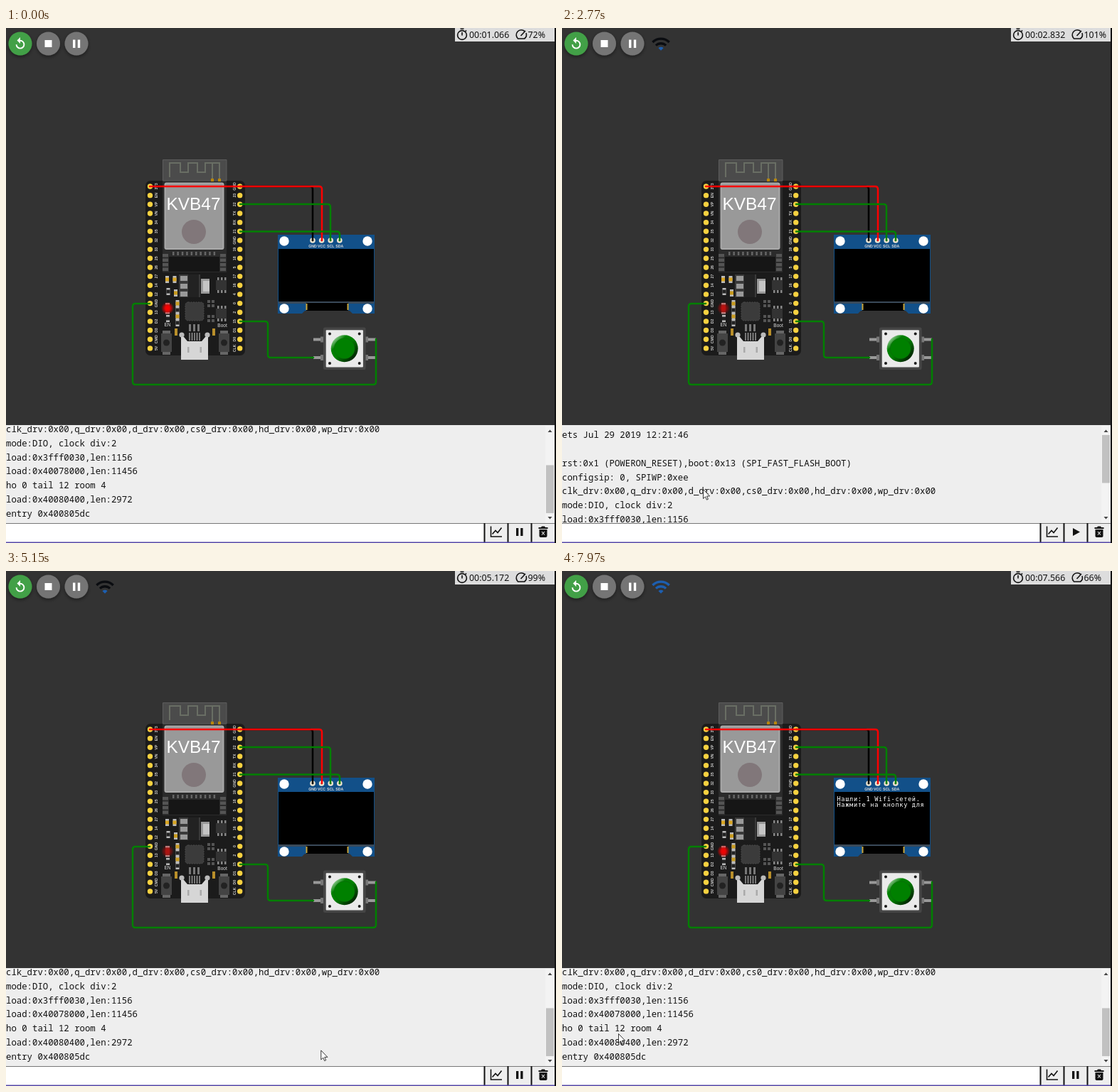
An HTML page for the animation above (8000 ms loop, 773 by 725 pixels).

```html
<!DOCTYPE html>
<html lang="en">
<head>
<meta charset="utf-8">
<title>Board simulation</title>
<style>
html, body { margin: 0; width: 100%; height: 100%; overflow: hidden; background: #333; }
svg { display: block; position: absolute; left: 0; top: 0; }
.ui { font: 12.4px "Noto Sans", "Open Sans", sans-serif; fill: #111; }
.log { font: 12.33px "Noto Sans Mono", monospace; fill: #111; }
.pin { font: bold 5.2px "Liberation Sans", sans-serif; fill: #ccc; text-anchor: middle; }
.tiny { font: 6.5px "Liberation Sans", sans-serif; fill: #ddd; text-anchor: middle; }
.lcd { font: 8.6px "DejaVu Sans Mono", monospace; letter-spacing: .68px; fill: #fff; }
.wire { fill: none; stroke: #008000; stroke-width: 2.5; stroke-linecap: round; }
.icon { fill: none; stroke: #111; stroke-width: 1.6; }
</style>
</head>
<body>
<svg width="773" height="725" viewBox="0 0 773 725">
  <defs>
    <radialGradient id="glow">
      <stop offset="0" stop-color="#f00"/>
      <stop offset=".4" stop-color="#f00" stop-opacity=".85"/>
      <stop offset="1" stop-color="#f00" stop-opacity="0"/>
    </radialGradient>
    <linearGradient id="cap" x2="1" y2="1">
      <stop offset="0" stop-color="#fff"/><stop offset=".3" stop-color="#008000"/>
      <stop offset=".5" stop-color="#008000"/><stop offset="1" stop-color="#000"/>
    </linearGradient>
    <filter id="soft" x="-50%" y="-50%" width="200%" height="200%">
      <feDropShadow dx="0" dy="2" stdDeviation="2.5" flood-opacity=".45"/>
    </filter>
    <clipPath id="pane"><path d="M0 560H758V697H0Z"/></clipPath>
  </defs>
  <path fill="#333" d="M0 0H773V725H0Z"/>

  <!-- toolbar -->
  <g filter="url(#soft)">
    <circle cx="20" cy="22" r="16.5" fill="#43a047"/>
    <circle cx="59.5" cy="22" r="16.5" fill="#757575"/>
    <circle cx="99" cy="22" r="16.5" fill="#757575"/>
  </g>
  <path d="M20 17.8A5.4 5.4 0 1 1 14.6 23.2" fill="none" stroke="#fff" stroke-width="1.9"/>
  <path d="M20 13V22L15.5 17.5Z" fill="#fff"/>
  <path d="M54.5 17H64.5V27H54.5ZM94 16.5H97.4V28H94ZM100.8 16.5H104.2V28H100.8Z" fill="#fff"/>
  <g id="wifi" transform="translate(125 8.3) scale(1.17)">
    <path d="M1 9l2 2c4.97-4.97 13.03-4.97 18 0l2-2C16.93 2.93 7.08 2.93 1 9z"/>
    <path d="M5 13l2 2c2.76-2.76 7.24-2.76 10 0l2-2C15.14 9.14 8.87 9.14 5 13z"/>
    <path d="M9 17l3 3 3-3c-1.65-1.66-4.34-1.66-6 0z" fill="#1d5fb0"/>
  </g>

  <!-- status -->
  <path fill="#ddd" d="M631 0H771V19H631Z"/>
  <g class="icon">
    <circle cx="641" cy="10" r="6.4"/>
    <path d="M638.5 1.2H643.5M641 6V10.5M645.6 4.8L647 3.4"/>
    <path d="M719.5 15A7 7 0 1 1 729 4.6M731 7A7 7 0 0 1 728.6 15M719 15H729"/>
    <path d="M723.5 11L730 4"/>
  </g>
  <text id="clock" class="ui" x="651" y="14"></text>
  <text id="load" class="ui" x="733.5" y="14"></text>

  <!-- board -->
  <rect x="196" y="215" width="140" height="246" rx="7" fill="#1b1b1b"/>
  <path fill="#2b2b2b" d="M220 185H310V344H220Z"/>
  <path fill="#4b4b4b" stroke="#5d5d5d" d="M220.5 185.5H310V215H220.5Z"/>
  <path fill="none" stroke="#696e64" stroke-width="2" d="M230 210V190H245V203H256V190H269V203H280V190H290V214M290 190H300V214"/>
  <path fill="#b8860b" d="M288 212H292V216H288ZM298 212H302V216H298Z"/>
  <rect x="223.5" y="218.5" width="82" height="92.5" rx="2" fill="#999" stroke="#aaa" stroke-width="2"/>
  <text x="263.5" y="256" text-anchor="middle" fill="#fff" style="font:24.4px 'Liberation Sans',Arial,sans-serif">KVB47</text>
  <circle cx="264" cy="287" r="17" fill="#81777a"/>
  <path fill="#161616" d="M229 322H300V343H229Z"/>
  <g id="parts"></g>
  <rect x="252" y="386" width="26" height="26" rx="4" fill="#3b3b3b" stroke="#4a4a4a" stroke-dasharray="2 1.5"/>
  <g id="pins"></g>
  <path fill="none" stroke="#aaa" stroke-width="1.3" d="M258 429V440M261.5 429V440M265 429V440M268.5 429V440M272 429V440"/>
  <circle cx="247" cy="432" r="3.6" fill="#bbb"/><circle cx="283" cy="432" r="3.6" fill="#bbb"/>
  <path fill="#d6d6d6" d="M246 435H250L255 441H275L280 435H284V467H246Z"/>
  <path fill="#aaa" d="M255 449H257.5V457H255ZM272.5 449H275V457H272.5Z"/>
  <text class="tiny" x="227" y="420">EN</text>
  <text class="tiny" x="304" y="421">Boot</text>

  <!-- display -->
  <path fill="#125089" d="M382 291H518V402H487L483 398H420L416 402H382Z"/>
  <g fill="#fff">
    <circle cx="391" cy="300" r="6.7"/><circle cx="508" cy="300" r="6.7"/>
    <circle cx="391" cy="395" r="6.7"/><circle cx="508" cy="395" r="6.7"/>
  </g>
  <path fill="#3a4a5a" d="M383 385H517V388H383Z"/>
  <path fill="#000" d="M383 311H517V385H383ZM422 387H481V398H422Z"/>
  <path fill="#c9a43b" d="M421.5 388H423.5V397H421.5ZM479.5 388H481.5V397H479.5Z"/>
  <g id="lcd" class="lcd">
    <text x="386.5" y="324">Нашли: 1 Wifi-сетей.</text>
    <text x="386.5" y="332">Нажмите на кнопку для</text>
  </g>
  <g id="header"></g>

  <!-- push button -->
  <path stroke="#999" stroke-width="4" d="M432 438.5H447M432 464H447M504 438.5H520M504 464H520"/>
  <path stroke="#777" stroke-width="8" d="M442 438.5H447M442 464H447M504 438.5H509M504 464H509"/>
  <rect x="446" y="421.5" width="59.6" height="59.5" rx="2.2" fill="#464646"/>
  <rect x="449.7" y="425.2" width="52.2" height="52.2" rx="1" fill="#eaeaea"/>
  <g fill="#1b1b1b">
    <circle cx="455" cy="430.5" r="2"/><circle cx="496.7" cy="430.5" r="2"/>
    <circle cx="455" cy="472" r="2"/><circle cx="496.7" cy="472" r="2"/>
  </g>
  <circle cx="475.7" cy="451.2" r="19" fill="url(#cap)"/>
  <circle cx="475.7" cy="451.2" r="14.5" fill="#008000" stroke="#2f2f2f" stroke-opacity=".47" stroke-width=".4"/>

  <!-- wires -->
  <path class="wire" style="stroke:#000" d="M329 223H427Q431 223 431 227V299"/>
  <path class="wire" style="stroke:#f00" d="M202 223H440Q444 223 444 227V299"/>
  <path class="wire" d="M329 248H452Q456 248 456 252V299"/>
  <path class="wire" d="M329 286.5H465Q469 286.5 469 290.5V299"/>
  <path class="wire" d="M329 413H364Q368 413 368 417V460Q368 464 372 464H432"/>
  <path class="wire" d="M202 388H182Q178 388 178 392V498Q178 502 182 502H516Q520 502 520 498V438"/>
  <circle id="led" cx="227" cy="394.5" r="9" fill="url(#glow)"/>

  <!-- serial monitor -->
  <path fill="#eee" d="M0 559H771V697H0Z"/>
  <g clip-path="url(#pane)"><g id="log" class="log"></g></g>
  <path fill="#f3f3f3" d="M758 560H771V697H758Z"/>
  <rect id="thumb" x="759" width="11" height="67.5" fill="#c1c1c1"/>
  <path fill="#444" d="M761.5 569H767.5L764.5 565.5ZM761.5 688H767.5L764.5 691.5Z"/>
  <path fill="#fff" d="M0 697H672V724H0Z"/>
  <path fill="#eee" d="M672 697H771V724H672Z"/>
  <path stroke="#777" d="M0 697.5H771"/>
  <path stroke="#111" stroke-width="2" d="M672.5 697V724M705.5 697V724M738.5 697V724"/>
  <path class="icon" d="M681.5 701.5V716H697M683.5 712.5L688 707.5L691 710.5L696.5 703.5"/>
  <path id="toggle" fill="#111"/>
  <path fill="#111" d="M748.5 703H752L753 701.5H757L758 703H761.5V705H748.5ZM749.5 706H760.5V715Q760.5 717 758.5 717H751.5Q749.5 717 749.5 715Z"/>
  <path stroke="#eee" stroke-width="1.1" d="M753 709L757 713.5M757 709L753 713.5"/>
  <path fill="#5548a8" d="M0 723.5H771V725H0Z"/>
  <path fill="#111" d="M771 0H773V725H771Z"/>

  <g id="cursor" fill="#fff" stroke="#222" stroke-linejoin="round">
    <path id="arrow" stroke-width=".9" d="M.5 .5V13.5L3.5 10.8L5.4 15.2L7.4 14.3L5.5 10H9.6Z"/>
    <path id="hand" d="M-1.7 11V1.5Q0 -1 1.7 1.5V6.5Q3 5.7 4 7Q5.2 6.4 6 7.8Q8 7.5 7.7 10.5Q7.6 14 6 16V19H-1.5V17L-5.6 11.5Q-5.8 9 -3.6 9.6Z"/>
  </g>
</svg>
<script>
const $ = id => document.getElementById(id);
const LOOP = 8000, STEP = 68.3, SCROLL_END = 87.5;

// ---- static repeats
const LEFT = '3V3 EN VP VN 34 35 32 33 25 26 27 14 12 GND 13 D2 D3 CMD 5V'.split(' ');
const RIGHT = 'GND 23 22 TX RX 21 GND 19 18 5 17 16 4 0 2 15 D1 D0 CLK'.split(' ');
const box = (x, y, w, h, fill) =>
  `<rect x="${x}" y="${y}" width="${w}" height="${h}" fill="${fill}"/>`;
const row = (n, f) => Array.from({ length: n }, (_, i) => f(i)).join('');

const pinColumn = (names, x, labelX) => names.map((name, i) => {
  const y = 223 + i * 12.66;
  return `<circle cx="${x}" cy="${y}" r="3.7" fill="#f7d140"/>
    <text class="pin" transform="translate(${labelX} ${y}) rotate(-90)">${name}</text>`;
}).join('');
$('pins').innerHTML = pinColumn(LEFT, 202.5, 213) + pinColumn(RIGHT, 328.7, 322.5);

// a passive part: light ends, coloured body
const chip = (x, y, fill) => box(x, y, 5, 10, '#bbb') + box(x, y + 2.5, 5, 5, fill);
const smd = (x, y) =>
  row(3, i => box(x + 2 + i * 5, y, 2.5, 22, '#888')) + box(x, y + 4, 15, 14, '#333');
const pads = (x, y) => row(4, i => box(x + (i % 2) * 6, y + (i >> 1) * 6, 4, 4, '#555'));
const pushKey = x => box(x + 2, 426, 11, 34, '#666') + box(x, 430, 15, 26, '#444') +
  `<circle cx="${x + 7.5}" cy="443" r="4.5" fill="#222"/>`;

$('parts').innerHTML =
  row(10, i => box(234 + i * 6.4, 315, 2.5, 5, '#666')) +
  row(4, i => box(220, 318 + i * 6.5, 8, 4.5, '#555') + box(301, 318 + i * 6.5, 8, 4.5, '#555')) +
  chip(224, 349, '#d9a520') + chip(234.5, 349, '#d9a520') +
  chip(225.5, 366, '#222') + chip(236, 368, '#c89a1c') +
  box(243, 347, 30, 32, '#3a3a3a') + box(256, 347, 15, 32, '#222') +
  row(3, i => box(245, 349 + i * 11, 10, 7, '#999')) +
  box(274, 353, 12, 21, '#999') + box(277, 356, 9, 15, '#c4c4c4') +
  smd(295, 351) + smd(295, 391) + pads(283, 383) + pads(283, 404) +
  row(4, i => chip(238.5, 383 + i * 9, i % 2 ? '#222' : '#c89a1c')) +
  box(224, 387, 6, 15, '#5e2722') + box(224, 387, 6, 2.5, '#a99') + box(224, 400, 6, 2.5, '#a99') +
  chip(225, 404, '#222') +
  box(237, 423, 4, 10, '#b98f2a') + box(290, 423, 4, 10, '#b98f2a') +
  row(3, i => box(257 + i * 6, 417, 3, 10, '#777')) +
  pushKey(218) + pushKey(299);

$('header').innerHTML = ['GND', 'VCC', 'SCL', 'SDA'].map((name, i) => {
  const x = 431 + i * 12.6;
  return `<circle cx="${x}" cy="299" r="3.8" fill="#efe6d0"/>
    <circle cx="${x}" cy="299" r="1.6" fill="#888"/>
    <text class="tiny" style="font-size:5.2px;font-weight:bold" x="${x}" y="309">${name}</text>`;
}).join('');

$('log').innerHTML = [
  'ets Jul 29 2019 12:21:46', '',
  'rst:0x1 (POWERON_RESET),boot:0x13 (SPI_FAST_FLASH_BOOT)',
  'configsip: 0, SPIWP:0xee',
  'clk_drv:0x00,q_drv:0x00,d_drv:0x00,cs0_drv:0x00,hd_drv:0x00,wp_drv:0x00',
  'mode:DIO, clock div:2',
  'load:0x3fff0030,len:1156',
  'load:0x40078000,len:11456',
  'ho 0 tail 12 room 4',
  'load:0x40080400,len:2972',
  'entry 0x400805dc'
].map((s, i) => `<text x="0" y="${577 + i * 19.85}">${s}</text>`).join('');

// ---- timelines: [time, value...]
const CLOCK = [[0, 1066], [1, 1066], [2, 1083], [4, 1083], [17, 1316], [19, 1316], [20, 1400],
  [25, 1733], [41, 2832], [61, 4166], [65, 4432], [92, 6249], [101, 6850], [117, 7566]]; // in steps
const LOAD = [[0, 72], [120, 64], [700, 38], [1330, 26], [2080, 84], [2250, 101],
  [3850, 99], [5500, 100], [6900, 86], [7400, 66]];
const LED = [[0, 1], [1680, .35], [2770, .6], [4130, .45], [4410, .35], [6250, .75], [7960, .95]];
const SCROLL = [[2640, SCROLL_END], [2770, 0], [4210, 0], [4412, 83], [4480, SCROLL_END]];
const POINTER = [[330, 180, 706], [600, 330, 640], [1070, 662, 492], [1340, 650, 478],
  [1680, 647, 471], [1780, 647, 471], [2090, 700, 598], [2300, 720, 698], [2400, 720, 698],
  [2700, 198, 649], [4560, 198, 649], [4830, 720, 698], [4980, 720, 698], [5340, 179, 652],
  [6260, 179, 652], [6950, 53, 650], [7300, 41, 650], [7600, 50, 651], [7960, 79, 651]];

function at(keys, t, col = 1) {
  const i = keys.findIndex(k => k[0] > t);
  if (i === 0) return keys[0][col];
  if (i < 0) return keys[keys.length - 1][col];
  const a = keys[i - 1], b = keys[i];
  return a[col] + (b[col] - a[col]) * (t - a[0]) / (b[0] - a[0]);
}
const hold = (keys, t) => keys.filter(k => k[0] <= t).pop()[1];
const show = (id, on) => { $(id).style.display = on ? '' : 'none'; };
const arcColor = on => on ? '#1d5fb0' : '#0a0c10';
const [outer, middle] = $('wifi').children;

function draw(n) {
  const t = Math.max(0, 1340 + (n - 20) * STEP);

  const ms = Math.floor(at(CLOCK, n) + 1e-6);
  $('clock').textContent = '00:0' + (ms / 1000).toFixed(3);
  $('load').textContent = hold(LOAD, t) + '%';

  // the arcs light up from the inside out
  const phase = t % 1200 / 1200;
  show('wifi', t > 1450);
  outer.setAttribute('fill', arcColor(phase > .55));
  middle.setAttribute('fill', arcColor(phase < .26 || phase > .43));

  $('led').setAttribute('opacity', at(LED, t));
  show('lcd', t > 7300);

  const y = at(SCROLL, t);
  $('log').setAttribute('transform', `translate(0 ${-y})`);
  $('thumb').setAttribute('y', 573 + y * .485);
  $('toggle').setAttribute('d', t > 2350 && t < 4900
    ? 'M718 704L728 709.5L718 715Z'
    : 'M717 704H720.3V715H717ZM723.2 704H726.5V715H723.2Z');

  const px = at(POINTER, t), py = at(POINTER, t, 2);
  const link = py < 559 || (py > 697 && px > 672);
  $('cursor').setAttribute('transform', `translate(${px} ${py})`);
  show('cursor', t > 325);
  show('hand', link);
  show('arrow', !link);
}

const start = performance.now();
function tick() {
  const t = (performance.now() - start) % LOOP;
  draw(20 + Math.floor((t - 1326) / STEP));
  requestAnimationFrame(tick);
}
tick();
</script>
</body>
</html>
```
